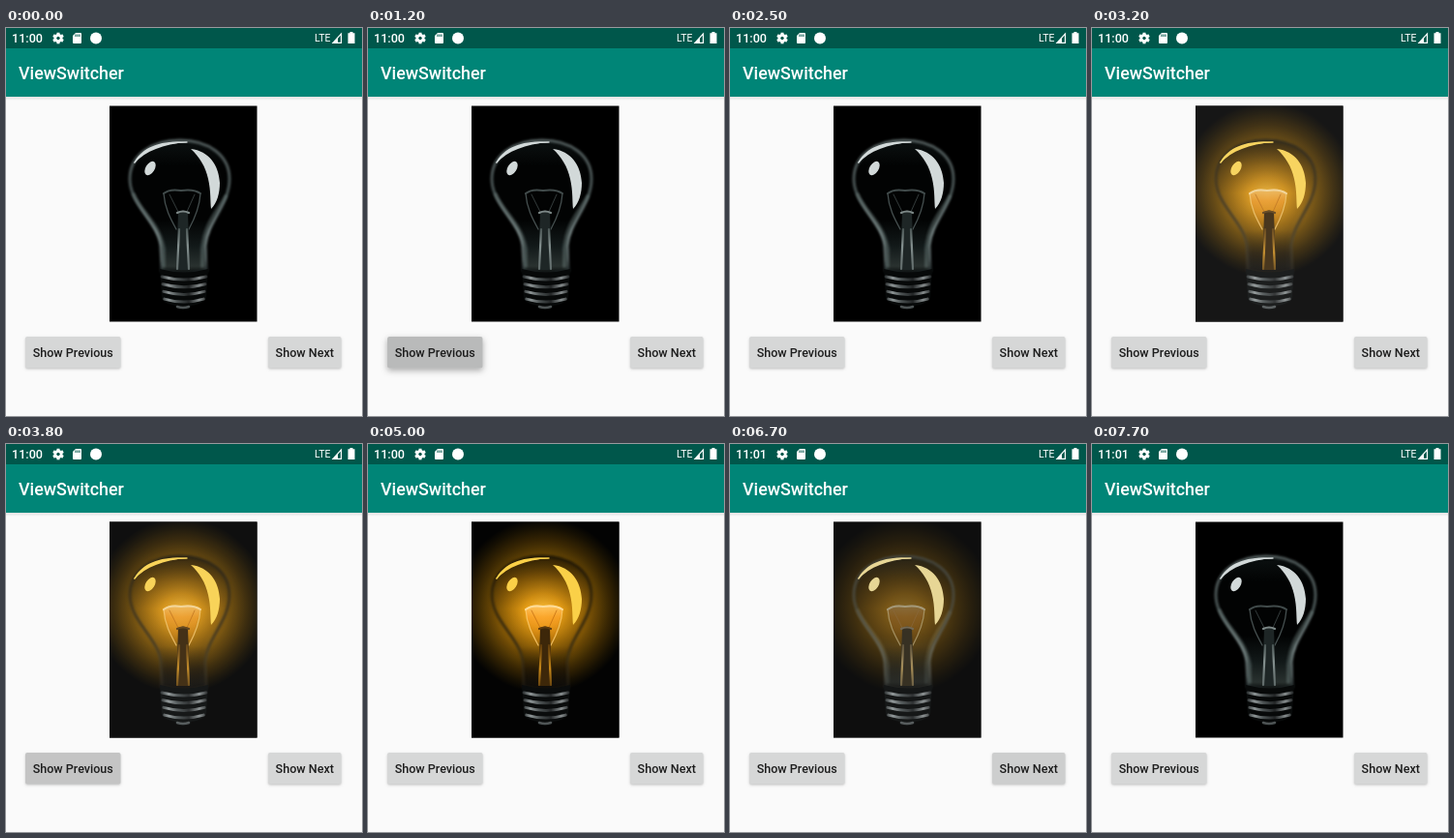
An HTML page with a canvas that plays this animation: 368 px wide and 401 px high, repeating every 8.5 s.

```html
<!DOCTYPE html>
<html lang="en">
<head>
<meta charset="utf-8">
<title>View switcher</title>
<style>
  html, body { margin: 0; width: 100%; height: 100%; overflow: hidden; background: #fafafa; }
  canvas { display: block; }
</style>
</head>
<body>
<canvas id="stage" width="368" height="401"></canvas>
<script>
const ctx = document.getElementById('stage').getContext('2d');
const LOOP = 8500, STEP = 100;
const PIC = { x: 107, y: 80.5, w: 152.5, h: 223 };
const LAYER = { x: 106, y: 80, w: 155, h: 225 };
const FADE_IN = 500, FADE_OUT = 400, RIPPLE_OUT = 240;
const BUTTONS = [
  { label: 'Show Previous', x: 20, w: 98.5, touch: 60 },
  { label: 'Show Next', x: 271, w: 75.5, touch: 306 }
];
// Each tap toggles the picture at its click time.
const TAPS = [
  { button: 0, down: 1080, click: 1200 },
  { button: 0, down: 1960, click: 2030 },
  { button: 0, down: 2780, click: 2900 },
  { button: 0, down: 3580, click: 3660 },
  { button: 1, down: 4530, click: 4565 },
  { button: 1, down: 5480, click: 5530 },
  { button: 1, down: 6180, click: 6565, up: 6500 },
  { button: 1, down: 7080, click: 7200 }
];
const clamp = v => Math.max(0, Math.min(1, v));

function gradient(g, stops) {
  stops.forEach(([at, color]) => g.addColorStop(at, color));
  return g;
}

function fillPath(c, d, style) {
  c.fillStyle = style;
  c.fill(new Path2D(d));
}

function strokePath(c, d, style, width) {
  c.strokeStyle = style;
  c.lineWidth = width;
  c.stroke(new Path2D(d));
}

function drawBase(c) {
  const metal = gradient(c.createLinearGradient(159, 0, 209, 0), [
    [0, '#1b1f20'], [.18, '#8d9495'], [.36, '#4c5253'], [.6, '#222526'], [.82, '#868c8d'], [1, '#17191a']
  ]);
  fillPath(c, 'M159 249 Q184 256 209 249 L207 280 Q201 286 191 287 L190 290 Q183 292 176 290 L175 287 Q164 285 161 280Z', '#070909');
  for (let i = 0; i < 4; i++) {
    const y = 257 + i * 7.7, inset = i * .9;
    strokePath(c, `M${161 + inset} ${y} Q184 ${y + 6} ${207 - inset} ${y}`, metal, 3);
  }
  strokePath(c, 'M177 288 Q183 290 189 288', '#4d5354', 2.5);
}

function drawFilament(c, lit) {
  if (lit) {
    fillPath(c, 'M162 171 Q168 165 181 167 Q195 165 201 171 L192 205 L173 205Z',
      gradient(c.createLinearGradient(0, 165, 0, 205), [[0, 'rgba(255,206,112,.95)'], [.35, 'rgba(255,160,40,.7)'], [1, 'rgba(225,130,10,.15)']]));
  }
  const wire = lit ? 'rgba(255,205,110,.8)' : '#465050';
  strokePath(c, 'M163 171 C164 186 170 197 176 208 M201 171 C200 186 195 197 189 208', wire, 1.3);
  strokePath(c, 'M169 172 L178 190 M195 172 L187 190', lit ? 'rgba(190,105,12,.7)' : '#353d3d', 1);
  strokePath(c, 'M163 171 Q169 166 181 168 Q194 166 201 171', lit ? '#ffdd98' : '#414b4b', 2);
  fillPath(c, 'M178 190 Q183 187 188 190 L190 250 L176 250Z', lit ? '#3a2406' : '#1e2626');
  strokePath(c, 'M177 191 Q183 188 189 191', lit ? '#5b390b' : '#7c8786', 2.2);
  strokePath(c, 'M179 208 L177 249 M187 208 L189 249', gradient(c.createLinearGradient(0, 208, 0, 249), lit
    ? [[0, '#5e3a08'], [.6, '#c78716'], [1, '#6a450c']]
    : [[0, '#4c5756'], [.4, '#84908f'], [1, '#5f6a69']]), 2.2);
}

function drawBulb(lit) {
  const canvas = document.createElement('canvas');
  canvas.width = LAYER.w;
  canvas.height = LAYER.h;
  const c = canvas.getContext('2d');
  c.translate(-LAYER.x, -LAYER.y);
  c.lineCap = 'round';
  c.fillStyle = '#000';
  c.fillRect(PIC.x, PIC.y, PIC.w, PIC.h);
  if (lit) {
    c.fillStyle = gradient(c.createRadialGradient(181, 174, 0, 181, 167, 90), [
      [0, '#ffc038'], [.2, '#e79d12'], [.4, '#a66e06'], [.58, '#694602'], [.76, '#352300'], [.9, '#130d00'], [1, '#000']
    ]);
    c.fillRect(PIC.x, PIC.y, PIC.w, PIC.h);
  }

  const glass = 'M180 116 C210 116 231 132 231 156 C231 183 208 200 206 225 L207 251 Q184 257 161 251 L160 225 C157 200 128 183 128 156 C128 132 150 116 180 116Z';
  fillPath(c, glass, gradient(c.createLinearGradient(0, 115, 0, 253), lit
    ? [[0, 'rgba(20,13,0,.75)'], [.2, 'rgba(40,25,0,.3)'], [.4, 'rgba(50,30,0,0)'], [.68, 'rgba(45,28,0,.1)'], [.85, 'rgba(20,13,3,.65)'], [1, '#0b0a08']]
    : [[0, '#0c1111'], [.2, '#020303'], [.6, '#020303'], [.8, '#121919'], [.95, '#29312f'], [1, '#0a0d0d']]));

  // Soft rim, brighter along the shoulders when the lamp is off.
  c.save();
  c.filter = 'blur(.8px)';
  strokePath(c, glass, gradient(c.createLinearGradient(0, 115, 0, 253), lit
    ? [[0, '#1e1502'], [.4, '#3b2908'], [.75, '#40300f'], [1, '#14110c']]
    : [[0, '#4e5858'], [.4, '#465151'], [.7, '#738080'], [.9, '#4b5656'], [1, '#1c2324']]), 3);
  if (!lit) {
    const inner = 'rgba(115,133,131,.4)';
    strokePath(c, 'M132 172 C140 191 158 201 163 228 L163 246', inner, 4);
    strokePath(c, 'M227 174 C217 192 206 201 203 228 L203 246', inner, 4);
  }
  c.restore();

  const shine = lit ? '#fbd046' : '#d2d9d9';
  c.save();
  c.filter = 'blur(.5px)';
  fillPath(c, 'M132 140 C139 124 160 115 187 118 C162 120 145 127 132 140Z', shine);
  strokePath(c, 'M133 139 C143 125 160 118 187 118', shine, 1.4);
  fillPath(c, 'M191 125 C210 127 220 142 221 160 C221 171 218 181 212 187 C211 179 212 169 209 156 C206 143 200 133 191 125Z', shine);
  c.beginPath();
  c.ellipse(149, 145, 4.6, 8, .55, 0, Math.PI * 2);
  c.fill();
  drawFilament(c, lit);
  drawBase(c);
  c.restore();
  return canvas;
}

const offView = drawBulb(false), litView = drawBulb(true);

function text(value, x, y, size, color, weight = 500, align = 'left') {
  ctx.font = `${weight} ${size}px Roboto, sans-serif`;
  ctx.textAlign = align;
  ctx.fillStyle = color;
  ctx.fillText(value, x, y);
}

function drawGear(x, y) {
  ctx.save();
  ctx.translate(x, y);
  ctx.fillStyle = ctx.strokeStyle = '#fff';
  for (let i = 0; i < 6; i++) {
    ctx.rotate(Math.PI / 3);
    ctx.fillRect(-1.5, -5.8, 3, 4);
  }
  ctx.lineWidth = 2.6;
  ctx.beginPath();
  ctx.arc(0, 0, 3.2, 0, Math.PI * 2);
  ctx.stroke();
  ctx.restore();
}

function drawBars(time) {
  ctx.fillStyle = gradient(ctx.createLinearGradient(0, 71, 0, 75), [[0, 'rgba(0,0,0,.1)'], [1, 'rgba(0,0,0,0)']]);
  ctx.fillRect(0, 71, 368, 4);
  ctx.fillStyle = '#008577';
  ctx.fillRect(0, 21, 368, 50);
  ctx.fillStyle = '#00574b';
  ctx.fillRect(0, 0, 368, 21);
  text(time < 5800 ? '11:00' : '11:01', 6, 15, 12.6, '#fff');
  text('LTE', 319, 14, 10.5, '#fff', 400);
  text('ViewSwitcher', 13, 53, 17.9, '#fff');

  drawGear(54, 10.5);
  fillPath(ctx, 'M72 5 H77 Q78 5 78 6 V15 Q78 16 77 16 H70 Q69 16 69 15 V8Z', '#fff');
  ctx.fillStyle = '#00574b';
  for (let i = 0; i < 3; i++) ctx.fillRect(71.5 + i * 2, 6.5, 1, 2.5);
  ctx.fillStyle = '#fff';
  ctx.beginPath();
  ctx.arc(93, 10.5, 6, 0, Math.PI * 2);
  ctx.fill();
  strokePath(ctx, 'M338 15.3 L346.5 15.3 L346.5 6Z', '#fff', 1.2);
  fillPath(ctx, 'M337 16 L343 9.5 V16Z', '#fff');
  fillPath(ctx, 'M355.5 4 H358.5 V5.2 H360.5 V16 H353.5 V5.2 H355.5Z', '#fff');
}

function drawPicture(time) {
  const count = TAPS.filter(tap => tap.click <= time).length;
  const lit = count % 2 === 1;
  const age = count ? time - TAPS[count - 1].click : LOOP;
  const entering = 1 - (1 - clamp(age / FADE_IN)) ** 2;
  const leaving = 1 - clamp(age / FADE_OUT) ** 2;
  ctx.globalAlpha = lit ? leaving : entering;
  ctx.drawImage(offView, LAYER.x, LAYER.y);
  ctx.globalAlpha = lit ? entering : leaving;
  ctx.drawImage(litView, LAYER.x, LAYER.y);
  ctx.globalAlpha = 1;
}

function drawButton(button, index, time) {
  const { label, x, w, touch } = button;
  const tap = TAPS.filter(t => t.button === index && t.down <= time).pop();
  const age = tap ? time - tap.down : 0;
  const released = tap ? time - (tap.up || tap.click) : LOOP;
  const lift = tap ? clamp(age / 60) * (1 - clamp(released / 100)) : 0;
  const ripple = tap ? 1 - clamp(released / RIPPLE_OUT) ** 2 : 0;

  const shape = new Path2D();
  shape.roundRect(x, 319, w, 32.5, 2);
  ctx.save();
  ctx.shadowColor = `rgba(0,0,0,${.22 + lift * .1})`;
  ctx.shadowBlur = 2.5 + lift * 4;
  ctx.shadowOffsetY = 1 + lift * 1.5;
  ctx.fillStyle = '#d6d7d7';
  ctx.fill(shape);
  ctx.restore();

  if (ripple > 0) {
    ctx.save();
    ctx.clip(shape);
    ctx.fillStyle = `rgba(0,0,0,${.06 * ripple})`;
    ctx.fill(shape);
    ctx.fillStyle = `rgba(0,0,0,${.08 * ripple})`;
    ctx.beginPath();
    ctx.arc(touch, 335, 35 + age * .5, 0, Math.PI * 2);
    ctx.fill();
    ctx.restore();
  }
  text(label, x + w / 2, 340, 12.55, '#1d1d1d', 500, 'center');
}

function draw(now) {
  const time = Math.floor(now % LOOP / STEP) * STEP;
  ctx.fillStyle = '#fafafa';
  ctx.fillRect(0, 0, 368, 401);
  drawBars(time);
  drawPicture(time);
  BUTTONS.forEach((button, i) => drawButton(button, i, time));
}

const start = performance.now();
function tick() {
  draw(performance.now() - start);
  requestAnimationFrame(tick);
}
tick();
</script>
</body>
</html>
```
